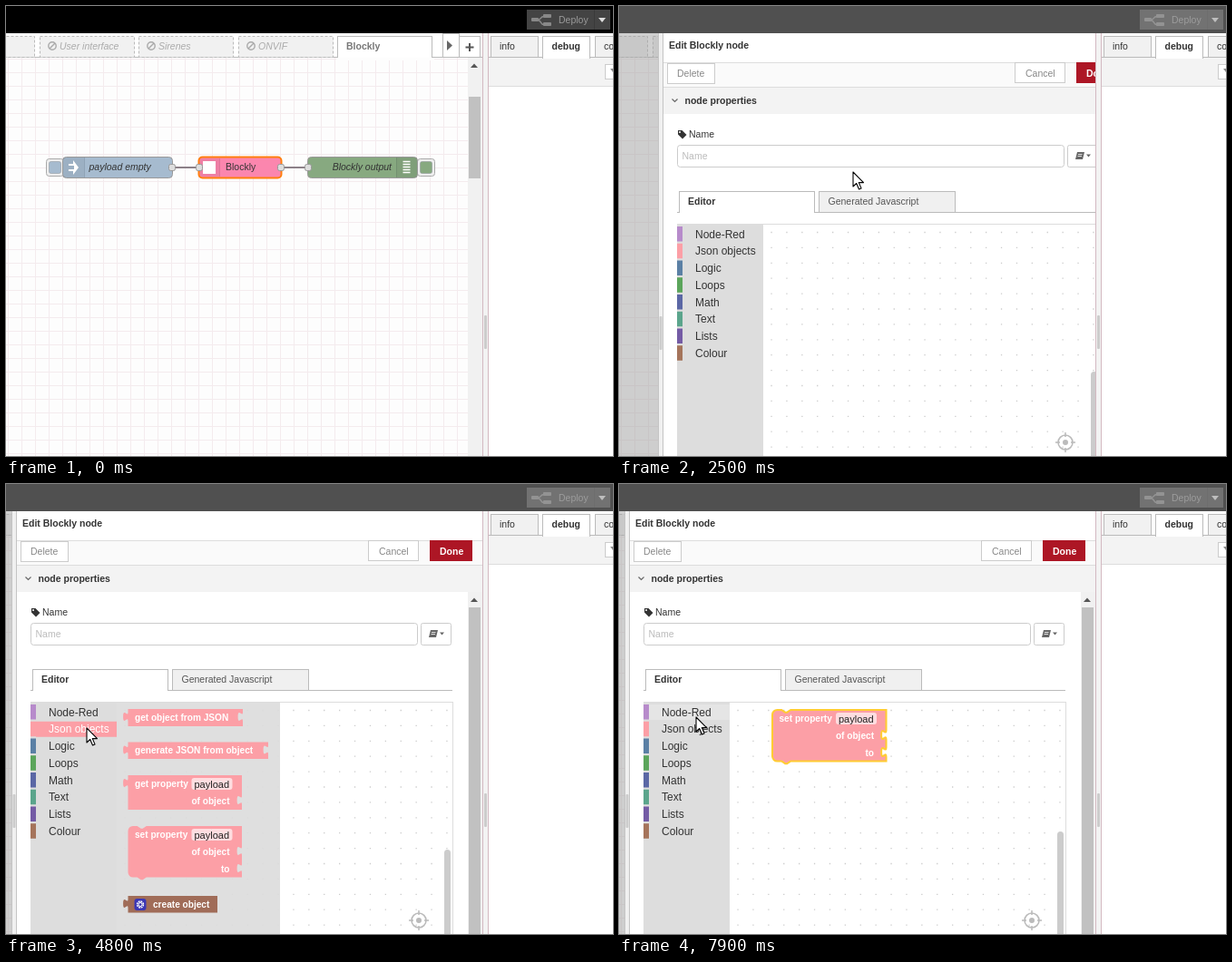
These frames come from a looping animation (669x496 px, 8000 ms). An HTML page:

```html
<!DOCTYPE html>
<html lang="en">
<head>
<meta charset="utf-8">
<title>Blockly node editor</title>
<style>
html, body { margin: 0; width: 100%; height: 100%; overflow: hidden; background: #fff; }
svg { display: block; width: 669px; height: 496px; }
text { font: 10.5px "Liberation Sans", Arial, sans-serif; white-space: pre; }
.b { font-weight: bold; }
.i { font-style: italic; }
.tool { font-size: 12px; }
.blk { font-size: 10.1px; font-weight: bold; fill: #fff; }
.field { font-size: 11px; }
</style>
</head>
<body>
<svg id="stage" viewBox="0 0 669 496"></svg>
<script>
const LOOP = 8000, STEP = 100;
const PINK = '#fc9fa6', YELLOW = '#fc3';

// Shape helpers
const fillBox = (x, y, w, h, fill, extra = '') =>
  `<rect x="${x}" y="${y}" width="${w}" height="${h}" fill="${fill}" ${extra}/>`;
const box = (x, y, w, h, fill, stroke, extra = '') =>
  fillBox(x + .5, y + .5, w - 1, h - 1, fill, `stroke="${stroke}" ${extra}`);
const path = (d, fill, extra = '') => `<path d="${d}" fill="${fill}" ${extra}/>`;
const line = (d, stroke, w = 1, extra = '') => path(d, 'none', `stroke="${stroke}" stroke-width="${w}" ${extra}`);
const label = (x, y, s, cls = '', fill = '#333', extra = '') =>
  `<text x="${x}" y="${y}" class="${cls}" fill="${fill}" ${extra}>${s}</text>`;
const group = (id, body, extra = '') => `<g id="${id}" ${extra}>${body}</g>`;
const END = 'text-anchor="end"';
const DASH = 'stroke-dasharray="3 2"';

function gridLines() {
  let d = '';
  for (let x = 2.5; x < 509; x += 15) d += `M${x} 57V496`;
  for (let y = 58.5; y < 496; y += 15) d += `M0 ${y}H509`;
  return line(d, '#f4ebee');
}

function flowTabs() {
  let s = fillBox(0, 30, 526, 27, '#fff') + line('M0 56.5H526', '#bbb');
  s += box(-60, 33, 92, 24, '#f1f1f1', '#bbb', DASH);
  [[37, 'User interface'], [146, 'Sirenes'], [256, 'ONVIF']].forEach(([x, name]) => {
    s += box(x, 33, 105, 24, '#f1f1f1', '#bbb', DASH);
    s += `<circle cx="${x + 14}" cy="44" r="4.2" fill="none" stroke="#aaa" stroke-width="1.4"/>`;
    s += line(`M${x + 11} 47l6-6`, '#aaa', 1.4) + label(x + 22, 48, name, 'i', '#aaa');
  });
  s += box(365, 33, 105, 26, '#fff', '#bbb') + fillBox(364, 57, 108, 3, '#fdfdfd');
  s += label(375, 48, 'Blockly', 'b', '#777', 'id="tabName"');
  s += box(481, 30, 19, 27, '#fff', '#bbb') + path('M486 38v11l6-5.5z', '#666');
  s += box(499, 33, 24, 24, '#fff', '#bbb') + line('M511 41v9M506.500 45.500h9', '#555', 2);
  return s;
}

const port = x => box(x - 4, 174, 8, 8, '#ddd', '#999', 'rx="2"');
const body = (x, w, fill, stroke = '#999', sw = 1) =>
  fillBox(x + .5, 166.5, w - 1, 23, fill, `rx="4" stroke="${stroke}" stroke-width="${sw}"`);
const sideButton = (x, fill) => box(x, 168, 20, 20, '#eee', '#aaa', 'rx="3"') +
  box(x + 3, 171, 14, 14, fill, '#8a9098', 'rx="2" stroke-opacity=".5"');

function flowNodes() {
  const blue = '#a6bbcf', green = '#87a980';
  return line('M184 178H213M304 178H333', '#8c8088', 2) +
    sideButton(44, blue) + body(62, 122, blue) + fillBox(63, 167, 23, 22, '#000', 'opacity=".06"') +
    line('M86.500 167V189', '#8fa3b6') +
    path('M69 174h5v-4l6 8-6 8v-4h-5v-2h6v-4h-6z', '#fff') + label(91.500, 181, 'payload empty', 'i') + port(183) +
    body(212, 92, '#fb86ae', '#ff7f0e', 2) + fillBox(214, 168, 22, 20, '#000', 'opacity=".05"') +
    line('M235.500 168V188', '#dd759a') + fillBox(217, 171, 14, 14, '#fff') +
    label(242, 181, 'Blockly') + port(213) + port(303) +
    sideButton(453, green) + body(332, 122, green) + fillBox(430, 167, 23, 22, '#000', 'opacity=".06"') +
    line('M430.500 167V189', '#739070') +
    line('M437.500 171.500h8m-8 3h8m-8 3h8m-8 3h8m-8 3h8', '#fff', 1.5) +
    label(425, 181, 'Blockly output', 'i', '#333', END) + port(333);
}

const scrollTrack = y => fillBox(509, y, 16, 496 - y, '#f1f1f1') + path(`M512 ${y + 11}h8l-4-4.500z`, '#555');

function header() {
  return fillBox(0, 0, 669, 30, '#000') + fillBox(574, 4, 92, 22, '#444') +
    line('M580 15.500h5c6 0 3-4 8-4M585 15.500c6 0 3 5 8 5', '#888', 1.5) +
    fillBox(579, 13, 8, 4, '#888', 'rx="1"') + fillBox(592, 9, 9, 4, '#888', 'rx="1"') +
    fillBox(592, 18, 9, 4, '#888', 'rx="1"') +
    label(609, 19, 'Deploy', '', '#999') + line('M648.500 4V26', '#3a3a3a') + path('M653 13h8l-4 5z', '#ddd');
}

function sidebar() {
  return fillBox(525, 30, 144, 466, '#fff') + fillBox(525, 30, 7, 466, '#f3f3f3') +
    line('M525.500 30V496M531.500 30V496', '#d3b9c1') + fillBox(527, 341, 3, 37, '#ccc', 'rx="1"') +
    fillBox(532, 57, 137, 31, '#f3f3f3') + line('M532 56.500H669', '#bbb') + line('M532 88.500H669', '#ddd') +
    box(534, 33, 53, 24, '#f1f1f1', '#bbb') + label(544, 48, 'info') +
    box(591, 33, 53, 25, '#fff', '#bbb') + fillBox(592, 56, 51, 2, '#fff') + label(601.500, 48, 'debug', 'b') +
    box(649, 33, 60, 24, '#f1f1f1', '#bbb') + label(659, 48, 'console') +
    box(660, 64, 40, 17, '#fff', '#ccc') + path('M666 69h8l-3 4v4h-2v-4z', '#888');
}

// Block outline in Blockly units, drawn at 0.675 scale
const U = .675;
function outline(w, h, inputs, statement) {
  const W = w / U, H = h / U;
  const top = statement ? 'M0 8A8 8 0 0 1 8 0H15l6 4h3l6-4' : 'M0 0';
  const sockets = inputs.map(y => `V${y / U + 5}c0 10-8-8-8 7.500s8-2.500 8 7.500`).join('');
  const end = statement ? 'H30l-6 4h-3l-6-4H8a8 8 0 0 1-8-8z' : 'H0V20c0-10-8 8-8-7.500s8 2.500 8-7.500z';
  return `${top}H${W}${sockets}V${H}${end}`;
}
const shape = (w, h, inputs, statement, fill, extra = '') =>
  path(outline(w, h, inputs, statement), fill, `transform="scale(${U})" ${extra}`);
const at = (x, y, s) => `<g transform="translate(${x} ${y})">${s}</g>`;
const payload = () => fillBox(70, 3, 45, 13, '#fff', 'rx="3" opacity=".65"') + label(73, 13.5, 'payload', 'field', '#222');
const setBlock = id =>
  shape(125.5, 56.5, [19, 38], true, PINK, `id="${id}" stroke="${YELLOW}" stroke-width="0"`) +
  label(7.5, 13, 'set property', 'blk') + payload() +
  label(112, 32, 'of object', 'blk', '', END) + label(112, 51, 'to', 'blk', '', END);

function flyout() {
  return fillBox(122, 240, 180, 256, '#ddd', 'opacity=".92"') +
    at(134.5, 248, shape(126.5, 19, [0], false, PINK) + label(7.5, 13, 'get object from JSON', 'blk')) +
    at(134.5, 284.5, shape(154.5, 18.5, [0], false, PINK) + label(7.5, 12.5, 'generate JSON from object', 'blk')) +
    at(134.5, 321, shape(125.5, 38, [19], false, PINK) + label(7.5, 13, 'get property', 'blk') +
      payload() + label(112, 32, 'of object', 'blk', '', END)) +
    at(134.5, 377, setBlock('flySet')) +
    at(134.5, 454, shape(98.5, 18.5, [], false, '#a06c58') + fillBox(7, 3, 13, 13, '#3b37b5', 'rx="3"') +
      `<circle cx="13.500" cy="9.500" r="3.400" fill="none" stroke="#fff" stroke-width="1.600" stroke-dasharray="1.800 .87"/>` +
      `<circle cx="13.500" cy="9.500" r="2" fill="none" stroke="#fff"/>` + label(27.5, 13, 'create object', 'blk'));
}

const tools = [['Node-Red', '#b78bcb'], ['Json objects', PINK], ['Logic', '#5b80a5'], ['Loops', '#5ba55b'],
  ['Math', '#5b67a5'], ['Text', '#5ba58c'], ['Lists', '#745ba5'], ['Colour', '#a5745b']];
const rowTop = i => 243 + i * 18.75;

function toolbox() {
  return fillBox(27, 240, 95, 256, '#ddd') + tools.map(([name, color], i) =>
    fillBox(33, rowTop(i), 89, 17, 'none', `id="row${i}"`) + fillBox(27, rowTop(i), 6, 16.5, color) +
    label(47, rowTop(i) + 12.7, name, 'tool', '#333', `id="tool${i}"`)).join('');
}

function dots() {
  let d = '';
  for (let y = 249.5; y < 496; y += 16.9)
    for (let x = 131; x < 491; x += 16.9) d += `M${x - .6} ${y}h1.300`;
  return line(d, '#cbcbcb', 1.3);
}

function tray() {
  return fillBox(6, 30, 520, 466, '#fff') + fillBox(6, 30, 6, 466, '#f0f0f0') +
    line('M6.500 30V496M11.500 30V496', '#c4c4c4') + fillBox(7.5, 342, 3, 37, '#ccc', 'rx="1"') +
    label(18, 47, 'Edit Blockly node', 'b') + fillBox(12, 62, 514, 28, '#fafafa') +
    line('M12 62.500H526M12 89.500H526', '#ddd') +
    box(16, 63, 53, 23, '#fff', '#ccc') + label(27, 78, 'Delete', '', '#888') +
    box(399, 62, 56, 23, '#fff', '#ccc') + label(411, 78, 'Cancel', '', '#888') +
    fillBox(467, 62, 47, 23, '#ad1625') + label(478, 78, 'Done', 'b', '#fff') +
    fillBox(12, 90, 514, 29, '#f3f3f3') + line('M21.500 102.500l3 3 3-3', '#666', 1.2) +
    label(35.5, 108, 'node properties', 'b') +
    scrollTrack(119) + fillBox(510, 136, 13, 360, '#c1c1c1') +
    path('M28 137h4.500l5 5-4.500 4.500-5-5z', '#333') + '<circle cx="30" cy="139" r="1" fill="#fff"/>' +
    label(40, 145, 'Name') + box(27, 153, 427, 25, '#fff', '#ccc', 'rx="3" id="input"') +
    label(32.5, 169, 'Name', '', '#bbb') + fillBox(32, 159, 1, 13, '#222', 'id="caret"') +
    box(457, 153, 34, 25, '#fff', '#ccc', 'rx="2"') +
    path('M468 161h8l-2 8h-8z', '#666') + line('M469 163.500h4.500M468.500 165.500h4.500', '#fff', .8) +
    path('M478 163.500h5l-2.500 3z', '#666') +
    line('M27 227.500H492', '#bbb') + box(29, 204, 150, 25, '#fff', '#bbb') + fillBox(28, 228, 152, 2, '#fff') +
    fillBox(30, 226, 148, 3, '#fff') + label(39, 219, 'Editor', 'b') +
    box(183, 204, 151, 24, '#f0f0f0', '#bbb', 'id="codeTab"') + label(193.5, 219, 'Generated Javascript', '', '#555') +
    box(27, 240, 466, 300, '#fff', '#ddd') + dots() +
    fillBox(483, 403, 7, 120, '#ccc', 'rx="3.5" id="thumb"') +
    `<circle cx="455" cy="481" r="8" fill="none" stroke="#bbb" stroke-width="1.600"/><circle cx="455" cy="481" r="3" fill="#bbb"/>` +
    line('M455 470v5M455 487v5M444 481h5M461 481h5', '#bbb', 1.5) +
    group('flyout', flyout()) + toolbox() + group('drag', setBlock('dragSet'));
}

// Pointers, each with its hot spot at the origin
const INK = 'stroke="#000" stroke-width="1.1" stroke-linejoin="round"';
const pointers = {
  arrow: path('M0 0V16l3.700-3.500L6.500 19l2.500-1.100L6.300 11.600H11.500z', '#fff', INK),
  cross: line('M0-10V10M-10 0H10', '#fff', 3) + line('M0-10V10M-10 0H10', '#000'),
  move: path('M0-11l4 4.500H1.200v5.300H6.500V-4L11 0 6.500 4V1.200H1.200V6.500H4L0 11-4 6.500h2.800V1.200H-6.500V4L-11 0l4.500-4v2.800h5.300V-6.500H-4z', '#fff', INK),
  hand: path('M-1.500 1.500c0-2 3-2 3 0V8c0-1.500 2.700-1.500 2.700.3 0-1.500 2.700-1.300 2.700.4 0-1.300 2.400-1 2.400.7V14c0 3-1.500 4-1.500 7.500H0C0 18-4.500 15.500-5.500 12c-.5-2 1.800-2.500 4 .5z', '#fff', INK),
  open: path('M-4 1L-5.500-4c-.5-2 1.500-2.500 2.200-.7L-2-1.500V-6.500c0-1.800 2.300-1.800 2.300 0v-.7c0-1.800 2.400-1.800 2.400 0v1.500c0-1.500 2.300-1.500 2.300 0v2c0-1.500 2-1.300 2 0V2.500C7 5 5.500 6 5.500 8.500h-8C-2.500 6-6 4.500-7.500 1.500-8.200-.5-6-.8-4 1z', '#fff', INK),
  closed: path('M-4.500-1V-4c0-1.500 2.200-1.800 2.700-.5 0-1.800 2.600-1.800 2.800 0 .3-1.500 2.600-1.300 2.700.3.400-1.300 2.300-1 2.300.7V2.500C6 4.500 4.500 5 4.500 7.500h-7C-2.500 5-6 4-6.300 1.500-6.500-.2-5.800-1-4.500-1z', '#fff', INK)
};

document.getElementById('stage').innerHTML =
  fillBox(0, 0, 669, 496, '#fdfdfd') + gridLines() + flowTabs() + scrollTrack(57) +
  fillBox(510, 100, 13, 90, '#c1c1c1', 'id="mainThumb"') + flowNodes() + header() +
  group('shade', fillBox(0, 0, 669, 496, '#a0a0a0', 'opacity=".5"')) +
  group('tray', tray()) + sidebar() +
  group('cursor', Object.keys(pointers).map(k => group(k, pointers[k])).join(''));

const $ = id => document.getElementById(id);
const set = (id, attr, value) => $(id).setAttribute(attr, value);
const show = (id, on) => set(id, 'visibility', on ? 'inherit' : 'hidden');
const move = (id, x, y) => set(id, 'transform', `translate(${x} ${y})`);

// Pointer path: time, x, y
const track = [[200, 560, 128], [300, 510, 180], [500, 510, 180], [900, 355, 240], [1300, 258, 183],
  [2900, 258, 183], [3200, 231, 215], [3300, 229, 214], [3400, 229, 214], [3800, 112, 277], [4000, 89, 269],
  [5300, 89, 269], [5800, 140, 362], [6100, 170, 397], [6500, 170, 397], [7100, 197, 334], [7400, 205, 269],
  [7900, 85, 257]];

function pointerAt(t) {
  const n = track.findIndex(k => k[0] >= t);
  if (n <= 0) return track[0].slice(1);
  const [t0, x0, y0] = track[n - 1], [t1, x1, y1] = track[n], p = (t - t0) / (t1 - t0);
  return [x0 + (x1 - x0) * p, y0 + (y1 - y0) * p];
}

function pointerKind(t, x, y, onTab) {
  if (t < 600) return 'arrow';
  if (t < 2500) return x < 304 && y < 190 ? 'move' : 'cross';
  if (t >= 6300 && t < 7400) return 'closed';
  if (onTab) return 'hand';
  return x > 122 && y > 240 ? 'open' : 'arrow';
}

function draw(t) {
  const [x, y] = pointerAt(t), editing = t >= 2400;
  const onTab = editing && x > 184 && x < 334 && y > 204 && y < 228;
  const kind = pointerKind(t, x, y, onTab);
  show('cursor', t >= 200);
  move('cursor', x, y);
  Object.keys(pointers).forEach(k => show(k, k === kind));

  set('tabName', 'fill', t < 1900 ? '#777' : '#333');
  set('mainThumb', 'fill', t >= 300 && t < 600 ? '#a8a8a8' : '#c1c1c1');

  const slide = Math.min(1, Math.max(0, (t - 2293) / 250));
  show('shade', editing);
  show('tray', editing);
  move('tray', Math.round(260 * (1 + Math.cos(Math.PI * slide))), 0);

  const focused = t >= 2600 && t < 4500;
  set('input', 'stroke', focused ? '#72a9e0' : t >= 4500 && t < 4600 ? '#a3bbd3' : '#ccc');
  set('input', 'width', focused ? 425 : 426);
  show('caret', editing && focused && Math.floor(t / 500) % 2 === 1);
  set('codeTab', 'fill', onTab ? '#dadada' : '#f0f0f0');

  const open = t >= 4800 && t < 6600;
  show('flyout', editing && open);
  tools.forEach((_, i) => {
    const hover = editing && x < 122 && y >= rowTop(i) && y < rowTop(i) + 18.75;
    const picked = open && i === 1;
    set('row' + i, 'fill', picked ? PINK : hover ? '#e5e5e5' : 'none');
    set('tool' + i, 'fill', picked ? '#fff' : '#333');
  });
  set('flySet', 'stroke-width', open && x > 135 && y > 377 ? 3 : 0);

  const drop = pointerAt(Math.min(t, 7400));
  show('drag', t >= 6600);
  move('drag', drop[0] - 36, drop[1] - 20);
  set('dragSet', 'stroke-width', 3);
  set('dragSet', 'fill-opacity', t < 7400 ? .8 : 1);
  set('thumb', 'y', t < 7500 ? 403 : 383);
}

const start = performance.now();
function tick() {
  const t = (performance.now() - start) % LOOP;
  draw(Math.floor(t / STEP) * STEP);
  requestAnimationFrame(tick);
}
tick();
</script>
</body>
</html>
```
